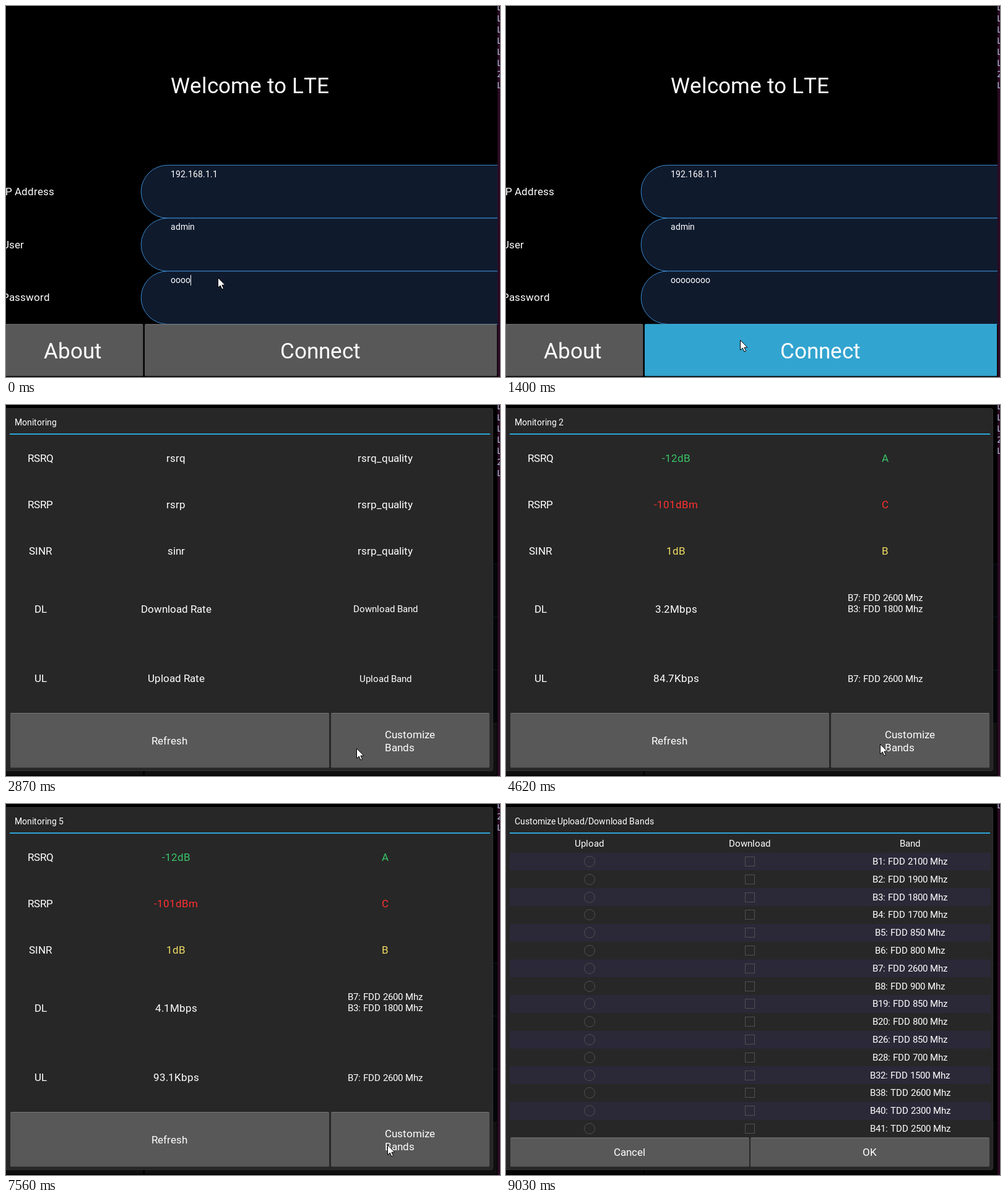
Animation of 798x600 px, one loop 9.17 s. Source, as an HTML page:

```html
<!DOCTYPE html>
<html lang="en">
<head>
<meta charset="utf-8">
<title>LTE monitor</title>
<style>
html, body { margin: 0; width: 100%; height: 100%; overflow: hidden; background: #000; }
svg { display: block; width: 798px; height: 600px; font-family: Roboto, sans-serif; }
.mono { font-family: "DejaVu Sans Mono", monospace; }
</style>
</head>
<body>
<svg id="stage" viewBox="0 0 798 600"></svg>
<script>
const LOOP = 9170, STEP = 70;
const stage = document.getElementById('stage');
const ruler = document.createElement('canvas').getContext('2d');
ruler.font = '1000px Roboto, sans-serif';

// Glyph advances snap to whole pixels, as in the app's text renderer.
const advances = {};
const advance = (ch, size) =>
  Math.round((advances[ch] ??= ruler.measureText(ch).width) * size / 1000);
const widthOf = (str, size) => [...str].reduce((w, ch) => w + advance(ch, size), 0);

function text(str, x, y, size, fill = '#fff') {
  const xs = [];
  for (const ch of str) {
    xs.push(x);
    x += advance(ch, size);
  }
  return `<text x="${xs.join(' ')}" y="${y}" font-size="${size}" fill="${fill}" xml:space="preserve">${str}</text>`;
}
const centred = (str, cx, y, size, fill) =>
  text(str, Math.floor(cx - widthOf(str, size) / 2), y, size, fill);
const rect = (x, y, w, h, fill, more = '') =>
  `<rect x="${x}" y="${y}" width="${w}" height="${h}" fill="${fill}" ${more}/>`;

function button(x, y, w, h, down) {
  return rect(x, y, w, h, down ? '#32a4d0' : '#585858', 'rx="1.5"') +
    rect(x + 1, y, w - 2, 1, down ? '#43add6' : '#787878');
}

// Last entry of a [time, value] table that has begun at t.
const at = (table, t) => table.reduce((v, [start, val]) => t >= start ? val : v, table[0][1]);

const typed = [[0, 4], [70, 5], [140, 6], [350, 7], [490, 8]];
const scrolled = [[0, 0], [1540, 1], [3360, 2], [3990, 3], [5460, 4], [6090, 5], [7630, 6], [8190, 7]];
const polls = [[0, 0], [3360, 1], [3990, 2], [5460, 3], [6090, 4], [7560, 5]];
const dims = [[0, 0], [1540, .5], [1610, .68], [1680, .82], [7630, .89], [7700, .93]];
const rates = [
  [0, ['Download Rate', 'Upload Rate']],
  [3360, ['2.8Mbps', '79.3Kbps']],
  [3990, ['3.2Mbps', '84.7Kbps']],
  [6090, ['4.1Mbps', '93.1Kbps']]
];

// Pointer path: time, x, y; the last column marks a move that eases.
const path = [
  [0, 342, 439], [840, 342, 439], [1330, 378, 539.5, 1],
  [1960, 378, 539.5], [2380, 476, 566, 1],
  [2590, 476, 566], [2870, 566, 555], [3220, 593, 549],
  [3290, 593, 549], [3430, 598, 549],
  [4550, 598, 549], [4620, 604, 548], [4970, 616, 551],
  [7980, 616, 551], [8190, 526, 61, 1],
  [8400, 526, 61], [8540, 468, 0], [8610, 440, -30], [LOOP, 440, -30]
];

function pointer(t) {
  const i = path.findIndex(p => p[0] > t);
  const [t0, x0, y0] = path[i - 1], [t1, x1, y1, ease] = path[i];
  let k = (t - t0) / (t1 - t0);
  if (ease) k = k * k * (3 - 2 * k);
  const x = Math.round(x0 + (x1 - x0) * k), y = Math.round(y0 + (y1 - y0) * k);
  return `<path transform="translate(${x + .5} ${y + .5})" fill="#fff" stroke="#000"
    d="M0 0V16L3.8 12.6L6.4 18.6L9 17.5L6.4 11.7H11.4Z"/>`;
}

function login(t) {
  const n = at(typed, t), down = t >= 1400 && t < 1540;
  let out = centred('Welcome to LTE', 394, 141, 35);
  const rows = [
    ['IP Address', '192.168.1.1', 306, 277],
    ['User', 'admin', 392, 362],
    ['Password', 'o'.repeat(n), 477, 448]
  ];
  rows.forEach(([label, value, labelY, valueY], i) => {
    const y = 257.4 + i * 85.7;
    out += `<path d="M800 ${y}H261A42.8 42.85 0 0 0 261 ${y + 85.7}H800" fill="#0f1a2d" stroke="#3b8cd2"/>` +
      text(label, -6, labelY, 17) + text(value, 266, valueY, 14);
  });
  if (t < 1400) out += rect(266 + 8 * n, 435, 1, 17, '#fff');
  return out + button(-20, 514.5, 241.5, 84, false) + button(224, 514.5, 569, 84, down) +
    centred('About', 108, 570, 35) + centred('Connect', 508, 570, 35);
}

const popup = title =>
  rect(-2.5, 5.5, 789, 586, '#272727', 'rx="3" stroke="#303030"') +
  text(title, 14, 33, 14) + rect(6, 46, 776, 2, '#2fa5d6');

function monitor(t) {
  const poll = at(polls, t), [dl, ul] = at(rates, t);
  const green = '#3ac569', red = '#ff3030', yellow = '#f0dc64';
  const signals = [
    ['RSRQ', 'rsrq', 'rsrq_quality', '-12dB', 'A', green],
    ['RSRP', 'rsrp', 'rsrp_quality', '-101dBm', 'C', red],
    ['SINR', 'sinr', 'rsrp_quality', '1dB', 'B', yellow]
  ];
  let out = popup(poll ? `Monitoring ${poll}` : 'Monitoring');
  signals.forEach(([name, idle, idleGrade, value, grade, colour], i) => {
    const y = 92 + 75 * i, fill = poll ? colour : '#fff';
    out += centred(name, 56, y, 17) + centred(poll ? value : idle, 275, y, 17, fill) +
      centred(poll ? grade : idleGrade, 613, y, 17, fill);
  });
  out += centred('DL', 56, 336, 17) + centred(dl, 275, 336, 17) +
    centred('UL', 56, 448, 17) + centred(ul, 275, 448, 17);
  out += poll
    ? text('B7: FDD 2600 Mhz', 552, 317, 15) + text('B3: FDD 1800 Mhz', 552, 335, 15) +
      text('B7: FDD 2600 Mhz', 552, 448, 15)
    : centred('Download Band', 613, 335, 15) + centred('Upload Band', 613, 448, 15);
  return out + button(7, 498, 515, 88.5) + button(525, 498, 256, 88.5) +
    centred('Refresh', 264, 549, 17) + text('Customize', 612, 539, 17) + text('Bands', 612, 560, 17);
}

const bands = ('B1 F 2100,B2 F 1900,B3 F 1800,B4 F 1700,B5 F 850,B6 F 800,B7 F 2600,B8 F 900,' +
  'B19 F 850,B20 F 800,B26 F 850,B28 F 700,B32 F 1500,B38 T 2600,B40 T 2300,B41 T 2500')
  .split(',').map(b => b.replace(/ (.) (.*)/, ': $1DD $2 Mhz'));

function customize() {
  let out = popup('Customize Upload/Download Bands') + centred('Upload', 134.5, 69, 15) +
    centred('Download', 393.5, 69, 15) + centred('Band', 652.5, 69, 15);
  bands.forEach((band, i) => {
    const y = 93 + 28.8 * i, mid = Math.round(y);
    if (i % 2 === 0) out += rect(6, y - 14.4, 777, 28.8, '#2b2938');
    out += `<circle cx="135" cy="${mid}" r="8.5" fill="none" stroke="#505050"/>` +
      rect(386.5, mid - 7.5, 15, 15, 'none', 'stroke="#505050"') +
      centred(band, 653, mid + 5, 15);
  });
  return out + button(7, 539.5, 386, 47) + button(395, 539.5, 386, 47) +
    centred('Cancel', 199.5, 569, 17) + centred('OK', 587.5, 569, 17);
}

// Sliver of the terminal window behind the app.
function terminal(t) {
  const shift = at(scrolled, t);
  let out = rect(794, 0, 4, 600, '#2c0a22');
  [...'LLLLLL2L'].forEach((ch, i, all) => {
    if (i + shift < all.length)
      out += `<text class="mono" x="793" y="${7 + 18 * i}" font-size="14" fill="#a9bbd8">${all[i + shift]}</text>`;
  });
  return out;
}

function draw(t) {
  let out = rect(0, 0, 798, 600, '#000') + login(t);
  if (t >= 1540) out += rect(0, 0, 794, 600, '#000', `opacity="${at(dims, t)}"`);
  if (t >= 7630) out += customize();
  else if (t >= 1540) out += monitor(t);
  return out + terminal(t) + pointer(t);
}

const start = performance.now();
let shown = -1;
function frame() {
  const now = Math.max(0, performance.now() - start) % LOOP;
  const t = Math.floor(now / STEP) * STEP;
  if (t !== shown) stage.innerHTML = draw(shown = t);
  requestAnimationFrame(frame);
}
frame();
</script>
</body>
</html>
```
